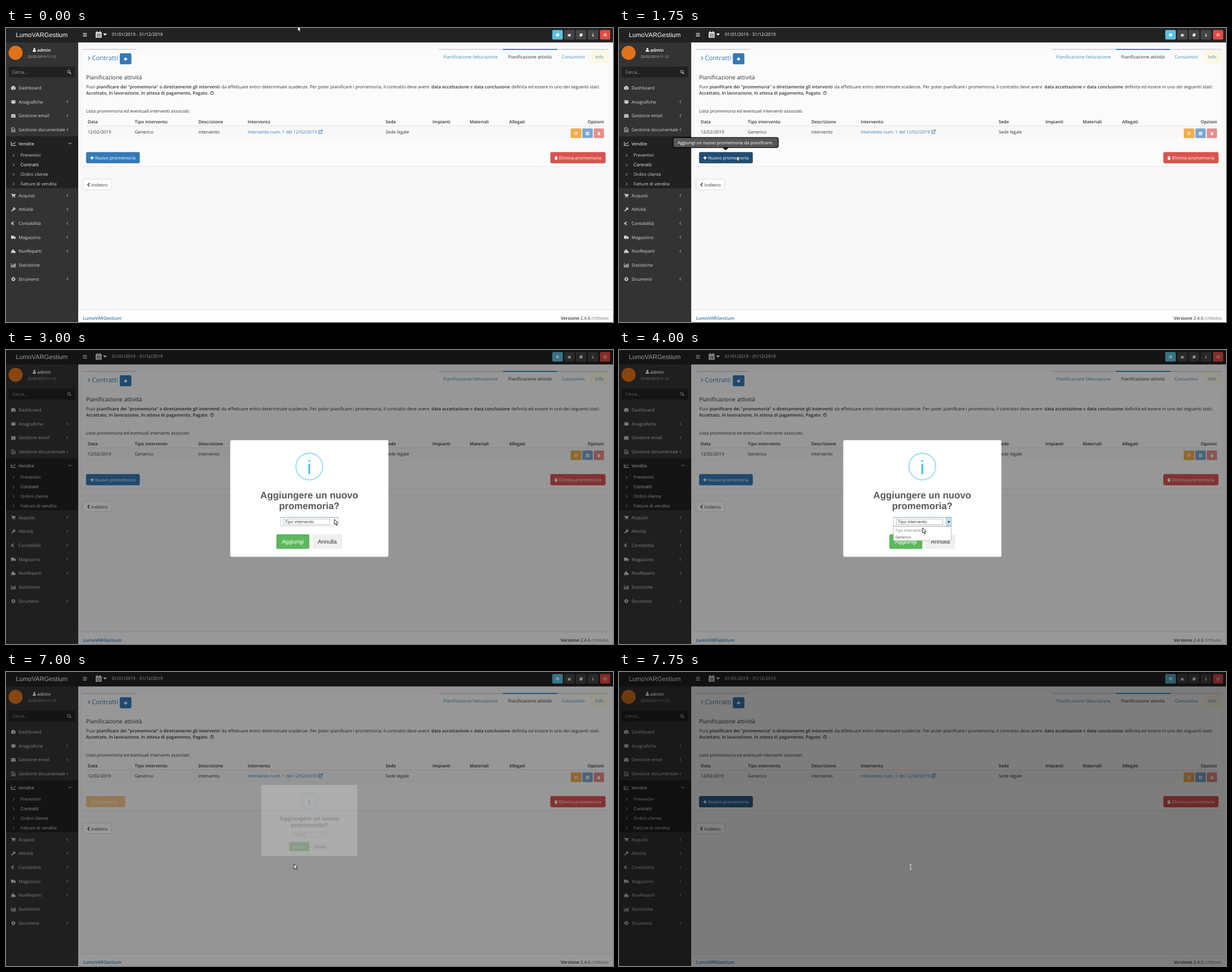
Write an HTML page that moves like this. It is 1076 by 521 pixels and loops after 8000 ms.

```html
<!DOCTYPE html>
<html lang="it">
<head>
<meta charset="utf-8">
<title>Pianificazione attività</title>
<style>
html, body { margin: 0; width: 100%; height: 100%; overflow: hidden; background: #f8f8f8; }
svg { display: block; width: 1076px; height: 521px; }
text { font: 7.85px "Open Sans", sans-serif; fill: #333; text-rendering: geometricPrecision; }
.b { font-weight: 600; }
.w, .w text { fill: #fff; }
.menu text { fill: #d6d6d6; }
.menu .on { fill: #fff; }
.link { fill: #337ab7; }
.small { font-size: 6.17px; fill: #c4c4c4; }
.sans, .sans text { font-family: "Liberation Sans", Arial, sans-serif; }
.mid { text-anchor: middle; }
.line { fill: none; stroke-linecap: round; stroke-linejoin: round; }
.ic { fill: #d6d6d6; stroke: none; }
.ics { fill: none; stroke: #d6d6d6; stroke-width: .9; }

/* every change is a hard step; 3.125% of the loop is 250 ms */
.a { animation: 8s step-end infinite; }
.cursor { animation-name: move; }
.arrow { animation-name: arrow; }
.beam { animation-name: beam; }
.tip { animation-name: tip; transform-origin: 189px 204.5px; }
.newbtn { animation-name: newbtn; }
.newlabel { animation-name: newlabel; }
.wait { animation-name: wait; }
.shade { animation-name: shade; }
.modal { animation-name: modal; transform-origin: 537.7px 263px; }
.list { animation-name: list; }
.hot { animation-name: hot; }
.ph { animation-name: ph; }
.val { animation-name: val; }
.ok { animation-name: ok; }
.t1 { animation-name: before; }
.t2 { animation-name: after; }

@keyframes move {
  0% { transform: translate(517px, -3.5px); }
  3.125% { transform: translate(518px, 38px); }
  6.25% { transform: translate(434px, 70px); }
  9.375% { transform: translate(290px, 147px); }
  12.5% { transform: translate(208.5px, 226.5px); }
  28.125% { transform: translate(300px, 250px); }
  31.25% { transform: translate(500px, 284px); }
  34.375% { transform: translate(577px, 290px); }
  37.5% { transform: translate(582px, 300px); }
  43.75% { transform: translate(572px, 306px); }
  46.875% { transform: translate(552px, 312px); }
  50% { transform: translate(538px, 315px); }
  53.125% { transform: translate(534px, 318px); }
  56.25% { transform: translate(528px, 322px); }
  59.375% { transform: translate(522px, 325.5px); }
  62.5% { transform: translate(518px, 327px); }
  65.625% { transform: translate(515px, 328px); }
  71.875% { transform: translate(513px, 334px); }
  75% { transform: translate(511px, 339px); }
  78.125%, 100% { transform: translate(510.5px, 340px); }
}
@keyframes arrow { 0% { opacity: 1; } 96.875%, 100% { opacity: 0; } }
@keyframes beam { 0% { opacity: 0; } 96.875%, 100% { opacity: 1; } }
@keyframes tip {
  0% { opacity: 0; }
  15.625% { opacity: 1; transform: none; }
  25% { opacity: .8; transform: scale(.225, .26); }
  28.125%, 100% { opacity: 0; }
}
@keyframes newbtn {
  0% { fill: #337ab7; stroke: #2e6da4; opacity: 1; }
  12.5% { fill: #286090; stroke: #204d74; opacity: 1; }
  21.875% { fill: #204d74; stroke: #122b40; opacity: 1; }
  25% { fill: #337ab7; stroke: #2e6da4; opacity: 1; }
  87.5% { opacity: 0; }
  90.625%, 100% { fill: #286090; stroke: #122b40; opacity: 1; }
}
@keyframes newlabel { 0% { opacity: 1; } 87.5% { opacity: 0; } 90.625%, 100% { opacity: 1; } }
@keyframes wait { 0% { opacity: 0; } 87.5% { opacity: .65; } 90.625%, 100% { opacity: 0; } }
@keyframes shade {
  0% { opacity: 0; }
  25% { opacity: .4; }
  90.625% { opacity: 0; }
  96.875%, 100% { opacity: .5; }
}
@keyframes modal {
  0% { opacity: 0; }
  25% { opacity: 1; transform: scale(.995); }
  28.125% { opacity: 1; transform: none; }
  87.5% { opacity: .22; transform: scale(.608); }
  90.625%, 100% { opacity: 0; }
}
@keyframes list { 0% { opacity: 0; } 40.625% { opacity: 1; } 68.75%, 100% { opacity: 0; } }
@keyframes hot { 0% { opacity: 0; } 59.375% { opacity: 1; } 68.75%, 100% { opacity: 0; } }
@keyframes ph { 0% { opacity: 1; } 68.75%, 100% { opacity: 0; } }
@keyframes val { 0% { opacity: 0; } 68.75%, 100% { opacity: 1; } }
@keyframes ok {
  0% { fill: #5cb85c; }
  68.75% { fill: #53a653; }
  84.375% { fill: #4a934a; }
  87.5%, 100% { fill: #5cb85c; }
}
@keyframes before { 0% { opacity: 1; } 71.875%, 100% { opacity: 0; } }
@keyframes after { 0% { opacity: 0; } 71.875%, 100% { opacity: 1; } }
</style>
</head>
<body>
<svg viewBox="0 0 1076 521" xmlns="http://www.w3.org/2000/svg">
<defs>
  <path id="left" class="line" d="M1-2L-1 0L1 2" stroke="#d6d6d6" stroke-width=".9"/>
  <path id="right" class="line" d="M-1-2L1 0L-1 2" stroke="#d6d6d6" stroke-width=".9"/>
  <path id="plus" d="M-3-.9H-.9V-3H.9V-.9H3V.9H.9V3H-.9V.9H-3Z" fill="#fff"/>
  <path id="trash" d="M-2.8-2.4H-1V-3.2H1V-2.4H2.8V-1.5H-2.8ZM-2.3-1H2.3V3.2H-2.3Z" fill="#fff"/>
  <g id="person"><circle cy="-1.6" r="1.8"/><path d="M-3 3.2C-3 0-1.6 0 0 .5C1.6 0 3 0 3 3.2Z"/></g>
</defs>

<!-- page body -->
<rect width="1076" height="521" fill="#f8f8f8"/>
<rect x="136" y="245" width="932" height="1" fill="#e6e6e6"/>
<rect x="136" y="38" width="932" height="207" fill="#fbfbfb"/>
<rect x="136" y="256" width="932" height=".7" fill="#eee"/>
<rect x="136" y="37" width="95" height="1.8" fill="#d2d6de"/>
<rect x="767" y="37" width="301" height="1.8" fill="#d2d6de"/>
<rect x="881" y="37" width="96" height="2" fill="#3c8dbc"/>
<rect x="1036" y="38.8" width="32" height="23" fill="#fcf8e3"/>
<g fill="#3c8dbc">
  <text x="775" y="53.6" style="fill:#3c8dbc">Pianificazione fatturazione</text>
  <text x="890" y="53.6">Pianificazione attività</text>
  <text x="985" y="53.6" style="fill:#3c8dbc">Consuntivo</text>
  <text x="1044.7" y="53.6" style="fill:#3c8dbc">Info</text>
</g>
<path class="line" d="M146 51L148.6 53.6L146 56.2" stroke="#337ab7" stroke-width="1.1"/>
<text x="152.3" y="57.4" class="link" style="font-size:11.25px">Contratti</text>
<rect x="202" y="45" width="20" height="19" rx="2" fill="#337ab7" stroke="#2e6da4" stroke-width=".5"/>
<use href="#plus" x="212" y="55"/>

<text x="142" y="90.8" style="font-size:10.09px">Pianificazione attività</text>
<text y="106.6"><tspan x="142">Puoi</tspan><tspan class="b" x="160.6">pianificare dei "promemoria" o direttamente gli interventi</tspan><tspan x="382">da effettuare entro determinate scadenze. Per poter pianificare i promemoria, il contratto deve avere</tspan><tspan class="b" x="754">data accettazione</tspan><tspan x="822.8">e</tspan><tspan class="b" x="829.5">data conclusione</tspan><tspan x="896">definita ed essere in uno dei seguenti stati:</tspan></text>
<text x="142" y="117.9"><tspan class="b">Accettato, In lavorazione, In attesa di pagamento, Pagato</tspan>.</text>
<circle cx="365" cy="115.2" r="2.9" fill="none" stroke="#333" stroke-width=".8"/>
<text x="365" y="117.2" class="b mid" style="font-size:5.4px">?</text>
<text x="142" y="150.2">Lista promemoria ed eventuali interventi associati:</text>

<rect x="142" y="174" width="921" height="23" fill="#f8f8f8"/>
<rect x="142" y="173" width="921" height="1" fill="#e4e4e4"/>
<g class="b">
  <text x="144.7" y="169" class="b">Data</text>
  <text x="228.3" y="169" class="b">Tipo intervento</text>
  <text x="341" y="169" class="b">Descrizione</text>
  <text x="428.5" y="169" class="b">Intervento</text>
  <text x="673" y="169" class="b">Sede</text>
  <text x="756" y="169" class="b">Impianti</text>
  <text x="822" y="169" class="b">Materiali</text>
  <text x="892" y="169" class="b">Allegati</text>
  <text x="1060" y="169" class="b" text-anchor="end">Opzioni</text>
</g>
<text x="144.7" y="187">12/02/2019</text>
<text x="228.3" y="187">Generico</text>
<text x="341" y="187">intervento</text>
<text x="428.5" y="187" class="link">Intervento num. 1 del 12/02/2019</text>
<path class="line" d="M557 181.6H554.3V187H559.6V184.6M556.7 184.6L560.6 180.8M558.4 180.7H560.7V183" stroke="#337ab7" stroke-width="1"/>
<text x="673" y="187">Sede legale</text>

<rect x="1001" y="178" width="19" height="17" rx="1.8" fill="#f0ad4e"/>
<circle cx="1010.5" cy="186.8" r="2.4" fill="none" stroke="#fff" stroke-width="1"/>
<path class="line" d="M1010.5 185.5V187H1009.6" stroke="#fff" stroke-width=".6"/>
<rect x="1021.5" y="178" width="18.7" height="17" rx="1.8" fill="#7aa8d0"/>
<path d="M1028 184.2H1033.8V190H1028Z" fill="#fff"/>
<path d="M1028 186H1033.8M1028 188H1033.8M1030 186V190M1032 186V190" stroke="#7aa8d0" stroke-width=".5"/>
<rect x="1042" y="178" width="18" height="17" rx="1.8" fill="#e68e8b"/>
<use href="#trash" transform="translate(1051 187) scale(.85)"/>

<rect class="a newbtn" x="142.3" y="220.3" width="94.5" height="19" rx="2" fill="#337ab7" stroke="#2e6da4" stroke-width=".7"/>
<g class="a newlabel w">
  <use href="#plus" x="152.5" y="230.2"/>
  <text x="158" y="232.9">Nuovo promemoria</text>
</g>
<g class="a wait w" opacity="0">
  <rect x="142" y="220" width="69.5" height="19.6" rx="2" fill="#f0ad4e"/>
  <circle cx="154.5" cy="230" r="3" fill="none" stroke="#fff" stroke-width="1.1" stroke-dasharray="1.2 1.15"/>
  <text x="160.5" y="232.9">Attendere...</text>
</g>
<rect x="965.3" y="220.3" width="97" height="19" rx="2" fill="#d9534f" stroke="#d43f3a" stroke-width=".7"/>
<use href="#trash" x="975" y="230.3"/>
<text x="980.3" y="232.9" class="w">Elimina promemoria</text>
<rect x="136.5" y="268" width="51" height="18.7" rx="2" fill="#fff" stroke="#ccc" stroke-width=".7"/>
<path d="M148 274.6L145 277.7L148 280.8" fill="none" stroke="#333" stroke-width="1.4"/>
<text x="151.5" y="280.6">Indietro</text>

<!-- footer -->
<rect x="128" y="499.5" width="948" height="21.5" fill="#fdfdfd"/>
<rect x="128" y="499" width="948" height=".8" fill="#d9dce2"/>
<text x="136.6" y="516.8" class="b link">LumoVARGestium</text>
<text x="983.3" y="516.8"><tspan class="b">Versione</tspan> 2.4.6</text>
<text x="1068" y="516.8" text-anchor="end" style="font-size:6.72px;fill:#777">(5ff8fe84)</text>

<!-- sidebar -->
<rect width="128" height="521" fill="#333"/>
<rect y="192" width="128" height="92" fill="#212121"/>
<circle cx="17" cy="44" r="12.5" fill="#e0731c"/>
<use href="#person" x="50.3" y="38.7" fill="#fff"/>
<text x="55.2" y="41.6" class="b w">admin</text>
<text x="38.3" y="53.2" class="small a t1">25/02/2019 11:12</text>
<text x="38.3" y="53.2" class="small a t2" opacity="0">25/02/2019 11:13</text>
<rect x="4.5" y="68.5" width="118" height="19" rx="2" fill="#212121"/>
<text x="11" y="80.8" style="fill:#a8a8a8">Cerca...</text>
<path class="line" d="M113.2 79.2L115 81" stroke="#ccc" stroke-width="1.3"/>
<circle cx="111.4" cy="77.4" r="2.4" fill="none" stroke="#ccc" stroke-width="1"/>

<g class="menu">
  <text x="22.3" y="108.9">Dashboard</text>
  <text x="22.3" y="133.6">Anagrafiche</text>
  <text x="22.3" y="158.3">Gestione email</text>
  <text x="22.3" y="183">Gestione documentale</text>
  <text x="22.3" y="207.7" class="on">Vendite</text>
  <text x="25.7" y="228.4">Preventivi</text>
  <text x="25.7" y="245.2" class="on">Contratti</text>
  <text x="25.7" y="262">Ordini cliente</text>
  <text x="25.7" y="278.8">Fatture di vendita</text>
  <text x="22.3" y="299.7">Acquisti</text>
  <text x="22.3" y="324.4">Attività</text>
  <text x="22.3" y="349.1">Contabilità</text>
  <text x="22.3" y="373.8">Magazzino</text>
  <text x="22.3" y="398.4">NuvReparti</text>
  <text x="22.3" y="423.1">Statistiche</text>
  <text x="22.3" y="447.8">Strumenti</text>
</g>
<use href="#left" x="108.7" y="130.6"/>
<use href="#left" x="108.7" y="155.3"/>
<use href="#left" x="108.7" y="180.2"/>
<path class="line" d="M111 203.7L113.2 205.8L115.4 203.7" stroke="#fff" stroke-width=".9"/>
<use href="#right" x="13.6" y="225.8"/>
<use href="#right" x="13.6" y="242.6"/>
<use href="#right" x="13.6" y="259.4"/>
<use href="#right" x="13.6" y="276.2"/>
<use href="#left" x="108.7" y="296.8"/>
<use href="#left" x="108.7" y="321.4"/>
<use href="#left" x="108.7" y="346.2"/>
<use href="#left" x="108.7" y="370.8"/>
<use href="#left" x="108.7" y="395.5"/>
<use href="#left" x="108.7" y="444.9"/>

<g class="ic">
  <path d="M9.8 109.2A4 4 0 1 1 16.2 109.2Z"/>
  <path d="M13 108L14.3 104.6M10.6 107H11.3M14.8 107H15.5" stroke="#333" stroke-width=".8"/>
  <use href="#person" transform="translate(10.8 130.2) scale(.7)"/>
  <use href="#person" transform="translate(15.4 130.2) scale(.7)"/>
  <use href="#person" transform="translate(13.1 131.2) scale(.85)"/>
  <rect x="9" y="152.7" width="8" height="6" rx=".8"/>
  <path d="M9 154L13 156.9L17 154" fill="none" stroke="#333" stroke-width=".7"/>
  <path class="ics" d="M10 176.8H14L16 178.8V184H10ZM11.4 180.2H14.6M11.4 182H14.6"/>
  <path class="ics" d="M9.3 201.6V208.2H17.6M10.8 206.3L12.6 204.2L14 205.4L16.8 202.2" style="stroke:#fff"/>
  <path class="ics" d="M9 294H10.5L11.6 298.2H16"/>
  <path d="M10.6 294.4H17L16.3 297.3L11.3 297.8Z"/>
  <circle cx="12" cy="299.8" r=".8"/><circle cx="15.6" cy="299.8" r=".8"/>
  <path class="ics" d="M10 324.6L13.8 320.8" style="stroke-width:1.8"/>
  <path d="M13 321.4A2.4 2.4 0 0 1 15.8 317.8L14.6 319.4L15.4 320.2L17 319A2.4 2.4 0 0 1 13 321.4Z"/>
  <path class="ics" d="M14.3 343.8A2.6 2.8 0 1 0 14.3 348.6M9.3 345.5H13.3M9.3 347H13" style="stroke-width:1"/>
  <path d="M9 368H13.8V373H9ZM14.2 369.3H15.8L17.2 371V373H14.2Z"/>
  <circle cx="11" cy="373.3" r="1"/><circle cx="15.3" cy="373.3" r="1"/>
  <path d="M9.4 394.3H11.6A1.3 1.4 0 1 1 13.6 394.3H15.3V396A1.3 1.3 0 1 1 15.3 398V399.2H13.4A1 1 0 1 0 11.6 399.2H9.4Z"/>
  <path class="ics" d="M9.2 416.8V423.6H17.6"/>
  <path d="M10.4 420.2H11.6V422.6H10.4ZM12.2 418.2H13.4V422.6H12.2ZM14 419.4H15.2V422.6H14ZM15.8 417.2H17V422.6H15.8Z"/>
  <circle cx="13" cy="445" r="2.2" fill="none" stroke="#d6d6d6" stroke-width="1.6"/>
  <circle cx="13" cy="445" r="3.2" fill="none" stroke="#d6d6d6" stroke-width="1" stroke-dasharray="1.25 1.263"/>
</g>

<!-- top bar -->
<rect width="1076" height="25.6" fill="#222"/>
<text x="63.5" y="15.8" class="sans mid w" style="font-size:11.2px">LumoVARGestium</text>
<path d="M136.5 9.5H143.3M136.5 12H143.3M136.5 14.5H143.3" stroke="#fff" stroke-width="1.2"/>
<path d="M159 7.4H169.4V17.2H159Z" fill="#fff"/>
<path d="M159.8 10H168.6M160 12.3H168.6M160 14.6H168.6M161.9 10V16.6M164.2 10V16.6M166.5 10V16.6" stroke="#222" stroke-width=".6"/>
<path d="M161.6 5.6V8.4M166.8 5.6V8.4" stroke="#fff" stroke-width="1.3"/>
<path d="M172 9.8H179L175.5 13.6Z" fill="#fff"/>
<text x="187.8" y="13.5" class="w">01/01/2019 - 31/12/2019</text>
<rect x="968.3" y="3.5" width="18.7" height="17" rx="2" fill="#5bc0de"/>
<rect x="989.3" y="3.5" width="18.7" height="17" rx="2" fill="#444"/>
<rect x="1010" y="3.5" width="18.7" height="17" rx="2" fill="#444"/>
<rect x="1031.2" y="3.5" width="18.7" height="17" rx="2" fill="#444"/>
<rect x="1053" y="3.5" width="18" height="17" rx="2" fill="#dd4b45"/>
<g fill="#fff">
  <path d="M975.8 9.6H979.6V11.6H980.6V14H979.8V15H975.6V14H974.8V11.6H975.8Z"/>
  <path d="M976.4 12.8H979V14.2H976.4Z" fill="#5bc0de"/>
  <ellipse cx="998.6" cy="12.8" rx="1.6" ry="2.3"/>
  <path class="line" d="M996 10.6L997.4 11.6M995.6 12.8H997M996 15L997.4 14M1001.2 10.6L999.8 11.6M1001.6 12.8H1000.2M1001.2 15L999.8 14" stroke="#fff" stroke-width=".7"/>
  <path d="M1017.6 9.8H1022.2L1021.2 14.8H1016.6Z"/>
  <path d="M1018.4 11.2H1020.8" stroke="#444" stroke-width=".5"/>
  <path d="M1039.8 9.4H1041.2V10.6H1039.8ZM1039.4 11.4H1041.2V14.2H1041.7V15H1039.4V14.2H1039.9V12.2H1039.4Z"/>
  <path class="line" d="M1060.6 10.4A2.4 2.4 0 1 0 1063.4 10.4M1062 9.4V12" stroke="#fff" stroke-width=".9"/>
</g>

<g class="a tip" opacity="0">
  <path d="M183.5 212H194.5L189 216.8Z" fill="#000"/>
  <rect x="96" y="194.2" width="186.3" height="17.6" rx="3" fill="#565656" stroke="#000" stroke-width="1.2"/>
  <text x="103.8" y="205.8" class="w">Aggiungi un nuovo promemoria da pianificare.</text>
</g>

<rect class="a shade" width="1076" height="521" opacity="0"/>

<!-- dialog -->
<g class="a modal sans" opacity="0">
  <rect x="397.5" y="159.7" width="280.4" height="206.8" rx="3" fill="#fff"/>
  <circle cx="537.6" cy="206.6" r="23.7" fill="none" stroke="#9de0f6" stroke-width="2.1"/>
  <text x="537.6" y="219.6" class="mid" style="font-size:34.5px;fill:#3fc3ee">i</text>
  <g class="mid">
    <text x="537.6" y="263.4" style="font-size:16.81px;font-weight:700;fill:#595959">Aggiungere un nuovo</text>
    <text x="537.6" y="281.8" style="font-size:16.81px;font-weight:700;fill:#595959">promemoria?</text>
  </g>
  <rect x="486.6" y="296.5" width="102.3" height="15.4" fill="#fff" stroke="#b4c6d4" stroke-width=".8"/>
  <path d="M486.3 296.5H589.2" stroke="#7f9db3" stroke-width=".8"/>
  <rect x="491.6" y="299.3" width="82.3" height="10.3" fill="#fff" stroke="#999" stroke-width=".6"/>
  <g class="a list" opacity="0"><rect x="580" y="297" width="8.8" height="14.6" fill="#c3e4f6" stroke="#6fb0d6" stroke-width=".7"/></g>
  <path d="M582.3 303.6H586.9L584.6 306.4Z" fill="#111"/>
  <text x="494.3" y="307.3" class="a ph" style="fill:#444">Tipo intervento</text>
  <text x="494.3" y="307.3" class="a val" opacity="0" style="fill:#444">Generico</text>
  <rect class="a ok" x="479.2" y="326.5" width="58.6" height="26" rx="2.6" fill="#5cb85c"/>
  <text x="508.5" y="342.6" class="mid w" style="font-size:10.09px">Aggiungi</text>
  <rect x="543.4" y="326.5" width="52.6" height="26" rx="2.6" fill="#efefef"/>
  <text x="569.6" y="342.6" class="mid" style="font-size:10.09px">Annulla</text>
  <g class="a list" opacity="0">
    <rect x="486.6" y="312.4" width="102.3" height="25.4" fill="#fff" stroke="#a5a5a5" stroke-width=".7"/>
    <rect class="a hot" x="487" y="325.3" width="101.5" height="12.1" fill="#d3eaf8" opacity="0"/>
    <text x="490" y="321.6" style="font:6.75px 'Open Sans',sans-serif;fill:#777">Tipo intervento</text>
    <text x="490" y="334" style="font:6.6px 'Open Sans',sans-serif">Generico</text>
  </g>
</g>

<!-- pointer -->
<g class="a arrow">
  <path class="a cursor" d="M0 0V9.2L2.1 7.4L3.6 10.8L5.2 10.1L3.7 6.8L6.4 6.5Z" fill="#fff" stroke="#111" stroke-width=".9" stroke-linejoin="round"/>
</g>
<path class="a beam" opacity="0" d="M515.2 341.3H516.4L516.9 341.8L517.4 341.3H518.6M516.9 341.5V349.5M515.2 349.7H516.4L516.9 349.2L517.4 349.7H518.6" fill="none" stroke="#f2f2f2" stroke-width=".9"/>
</svg>
</body>
</html>
```
